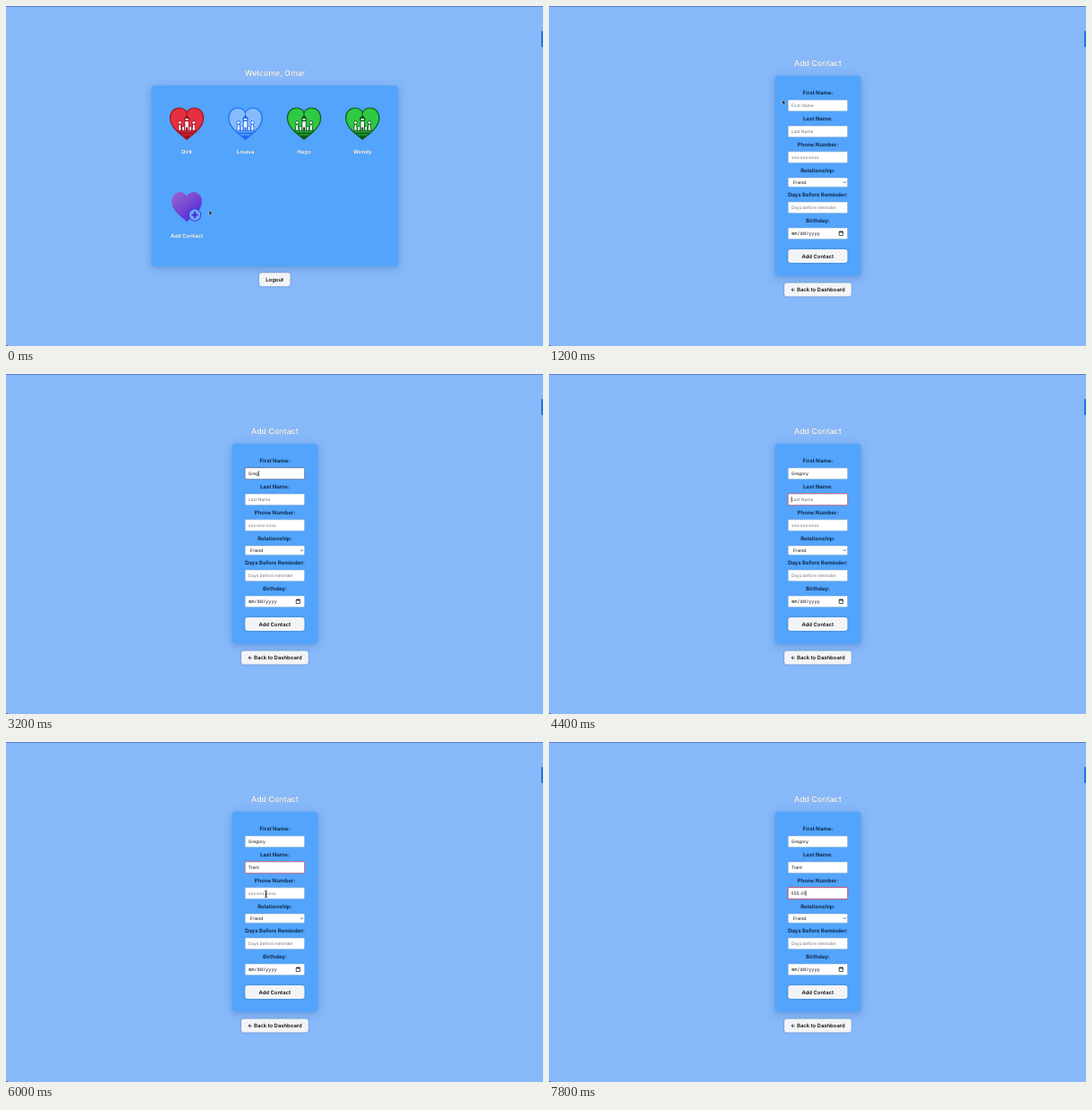
Recreate the animation shown at these times as an HTML page. Size 600x380 px, loop 8000 ms.

```html
<!DOCTYPE html>
<html lang="en">
<head>
<meta charset="utf-8">
<title>Contacts</title>
<style>
  html, body { margin: 0; width: 100%; height: 100%; overflow: hidden; background: #86b8fa; }
  svg { display: block; width: 600px; height: 380px; }
  text { font-family: Inter, "Open Sans", sans-serif; text-rendering: geometricPrecision; white-space: pre; }
  .mid { text-anchor: middle; }
  .title { font-size: 8.8px; font-weight: 600; fill: #fff; filter: drop-shadow(.5px .6px .7px #0007); }
  .name { font-size: 6px; font-weight: 700; fill: #fff; filter: drop-shadow(.4px .5px .4px #0007); }
  .label { font-size: 6px; font-weight: 700; fill: #112c50; }
  .btn { font-size: 5.9px; font-weight: 600; fill: #111; }
  .value { font-size: 4.9px; fill: #111; }
  .hint { font-size: 4.9px; fill: #777; }
  .small { font-size: 4.4px; fill: #444; }
  .date { font: 5.3px "Noto Sans Mono", "DejaVu Sans Mono", monospace; fill: #111; }
  .card { fill: #52a4fc; filter: drop-shadow(0 2px 4px #1c4c8850); }
  .button { fill: #f3f4f6; filter: drop-shadow(0 .6px .8px #0004); }
  .field { fill: #fff; stroke: #8fa6c4; stroke-width: .5; }
</style>
</head>
<body>
<svg id="stage" viewBox="0 0 600 380" xmlns="http://www.w3.org/2000/svg">
  <defs>
    <linearGradient id="violet" x1="0" y1="0" x2=".8" y2="1">
      <stop offset="0" stop-color="#a065cf"/>
      <stop offset=".5" stop-color="#7648d3"/>
      <stop offset="1" stop-color="#4a25dc"/>
    </linearGradient>
    <path id="heart" d="M0 17.5C-6 12-18.6 5-18.6-6.5-18.6-13-14-17.5-8.8-17.5-5-17.5-1.6-15.8 0-12.6 1.6-15.8 5-17.5 8.8-17.5 14-17.5 18.6-13 18.6-6.5 18.6 5 6 12 0 17.5Z"/>
    <clipPath id="inHeart"><use href="#heart"/></clipPath>
  </defs>
  <rect width="600" height="380" fill="#86b8fa"/>
  <rect width="600" height="1" fill="#5a7fd0"/>
  <rect x="598" y="28" width="4" height="18" rx="1" fill="#1d72dd"/>
  <rect y="379" width="1.5" height="1" fill="#2b426c"/>
  <g id="home"></g>
  <g id="form"></g>
  <g id="popup"></g>
  <path id="arrow" d="M0 0V5.2L1.2 4.1 2 6 2.9 5.6 2.1 3.8H3.7Z" fill="#111" stroke="#fff" stroke-width=".35"/>
  <path id="beam" d="M-1.4-3.8Q0-3.8 0-3V3Q0 3.8-1.4 3.8M1.4-3.8Q0-3.8 0-3V3Q0 3.8 1.4 3.8M-.8.8H.8" fill="none" stroke="#111" stroke-width=".7"/>
</svg>
<script>
const LOOP = 8000, STEP = 200, FORM_AT = 1200;
const $ = id => document.getElementById(id);

const text = (x, y, s, cls, id = '') => `<text x="${x}" y="${y}" class="${cls}" id="${id}">${s}</text>`;
const box = (x, y, w, h, r, cls) => `<rect x="${x}" y="${y}" width="${w}" height="${h}" rx="${r}" class="${cls}"/>`;

// Heart badge with a tower and two figures
function badge(x, name, fill, line) {
  const figure = s => `<g transform="translate(${s * 7.8} 0)">
    <circle cy="-1.2" r="1.9"/><path d="M-1.1.8H1.1L1.9 7.6H-1.9Z"/></g>`;
  return `<g transform="translate(${x} 131.5)">
    <use href="#heart" fill="${fill}"/>
    <g clip-path="url(#inHeart)">
      <rect x="-19" y="8" width="38" height="10" fill="${line}"/>
      <path d="M-13 9.3H13M-8 12.4H8" stroke="${fill}" stroke-width="1"/>
    </g>
    <g fill="#fff" stroke="${line}" stroke-width=".9">
      <path d="M-2.2 7.8V-3H2.2V7.8Z"/>
      <path d="M-2.6-3.4V-6L0-9.4 2.6-6V-3.4Z" fill="${line}"/>
      <path d="M0-9V-13"/>
      <path d="M-1.7-4V-5.6H1.7V-4Z" stroke="none"/>
      <path d="M-5.4 7.8V3.6Q-4 1.6-2.6 3.6V7.8ZM5.4 7.8V3.6Q4 1.6 2.6 3.6V7.8Z"/>
      ${figure(-1)}${figure(1)}
      <path d="M-1 7.6V4.4Q0 3 1 4.4V7.6Z" fill="${line}" stroke="none"/>
    </g>
    <use href="#heart" fill="none" stroke="${line}" stroke-width="1.2"/>
  </g>` + text(x, 165.2, name, 'name mid');
}

$('home').innerHTML =
  text(300.5, 78, 'Welcome, Omar', 'title mid') +
  box(162.5, 89, 275.8, 202, 4, 'card') +
  badge(202, 'Dirk', '#e5303f', '#9f1220') +
  badge(267.5, 'Louisa', '#86bbfc', '#1b6df0') +
  badge(333, 'Hugo', '#2fc943', '#0b5a17') +
  badge(398.3, 'Wendy', '#2fc943', '#0b5a17') +
  `<g id="adder">
    <use href="#heart" transform="scale(.91 .95)" fill="url(#violet)"/>
    <circle cx="9" cy="9" r="7.2" fill="#4b36d6"/>
    <circle cx="9" cy="9" r="6.2" fill="#6fa6f6"/>
    <path d="M9 5.6V12.4M5.6 9H12.4" stroke="#4030cf" stroke-width="2.2"/>
  </g>` +
  text(202, 258.8, 'Add Contact', 'name mid') +
  box(283, 298.2, 34.5, 15, 3, 'button') +
  text(300.2, 307.9, 'Logout', 'btn mid');

const labels = [
  ['First Name:', 99.2], ['Last Name:', 128], ['Phone Number:', 156.7],
  ['Relationship:', 185.5], ['Days Before Reminder:', 213.2], ['Birthday:', 241.7]
];
const inputs = [
  { y: 105, hint: 'First Name', value: 'Gregory', ring: '#5d6f8c', dash: '1.2 .7' },
  { y: 134, hint: 'Last Name', value: 'Trent', ring: '#c0708e', dash: 'none' },
  { y: 162.8, hint: 'xxx-xxx-xxxx', value: '555-01', ring: '#c85a78', dash: 'none' }
];
const field = (y, h = 12.4) => box(267.2, y, 66.3, h, .8, 'field');

$('form').innerHTML =
  text(300.3, 67, 'Add Contact', 'title mid') +
  box(252.5, 77.8, 96, 223.7, 4, 'card') +
  labels.map(([s, y]) => text(300.4, y, s, 'label mid')).join('') +
  inputs.map((f, i) => field(f.y) + text(270.8, f.y + 8, f.hint, 'hint', 'in' + i)).join('') +
  field(192, 10.2) + text(272.8, 198.9, 'Friend', 'value') +
  '<path d="M328.9 196.4L330.4 197.9 331.9 196.4" fill="none" stroke="#222" stroke-width=".7"/>' +
  field(219) + text(270.8, 227, 'Days before reminder', 'hint') +
  field(248) + text(271, 256, 'mm/dd/yyyy', 'date') +
  '<path d="M324.2 252.3H328.4V256.4H324.2ZM325.2 251.2V252M327.4 251.2V252" fill="none" stroke="#111" stroke-width=".7"/>' +
  '<path d="M324.2 252.8H328.4" stroke="#111"/>' +
  box(267.2, 272, 66.3, 15, 3, 'button') + text(300.3, 281.8, 'Add Contact', 'btn mid') +
  box(263, 309.5, 74.8, 15, 3, 'button') + text(300.3, 319.2, '← Back to Dashboard', 'btn mid') +
  '<rect id="ring" x="266.8" width="67" height="13.2" rx="1.2" fill="none" stroke-width="1"/>' +
  '<rect id="caret" width=".6" height="6.4" fill="#111"/>';

const person = y => `<g transform="translate(299.9 ${y})" fill="none" stroke="#333" stroke-width=".6">
  <circle r="2.5"/><circle cy="-.6" r=".9"/><path d="M-1.7 1.7Q0 .1 1.7 1.7"/></g>`;
$('popup').innerHTML =
  `<path d="M294 121H297.4L300 118.2 302.6 121H345Q346.4 121 346.4 122.4V160.8Q346.4 162.2 345 162.2H294.2Q292.8 162.2 292.8 160.8V122.4Q292.8 121 294 121Z"
    fill="#fafafa" style="filter:drop-shadow(0 .6px 1px #0006)"/>
  <path d="M292.8 146H346.4" stroke="#d8d8d8" stroke-width=".6"/>` +
  person(133) + person(154.2) +
  text(307.2, 130.9, 'OMAR', 'value', 'pick') +
  text(307.2, 138.7, 'OMAR TOVEK', 'small') +
  text(307.2, 156, 'Manage...', 'value');

// [time, field, letters typed]
const edits = [
  [1600, 0, 0], [2800, 0, 1], [3000, 0, 2], [3200, 0, 4], [3400, 0, 5], [3600, 0, 6], [4000, 0, 7],
  [4400, 1, 0], [4800, 1, 1], [5000, 1, 2], [5200, 1, 3], [5400, 1, 5],
  [6200, 2, 0], [6800, 2, 1], [7000, 2, 2], [7200, 2, 3], [7600, 2, 5], [7800, 2, 6]
];
// [time, pointer, x, y]
const pointer = [
  [0, 'arrow', 227, 228.5], [200, 'arrow', 223, 227.5], [400, 'arrow', 215, 225],
  [600, 'arrow', 211, 223], [800, 'arrow', 209.3, 222.3], [1200, 'arrow', 261, 105],
  [1400, 'beam', 274, 110], [1600, 'beam', 281, 111.5], [1800, 'arrow', 338, 126],
  [2000, 'arrow', 385, 147], [2200, 'arrow', 399.3, 151.3], [2800, ''],
  [5800, 'arrow', 355, 160], [6000, 'beam', 290.5, 170], [6800, '']
];
const hover = [[0, 1], [400, 1.08], [600, 1.16]];
const popups = [[0, -1], [1600, 0], [3000, -1], [6200, 2], [6800, -1]];

const at = (list, t) => list.filter(s => s[0] <= t).pop();
const show = (id, on) => $(id).setAttribute('display', on ? 'inline' : 'none');
const move = (id, x, y, s = 1) => $(id).setAttribute('transform', `translate(${x} ${y}) scale(${s})`);

function draw(t) {
  show('home', t < FORM_AT);
  show('form', t >= FORM_AT);
  move('adder', 202, 224.5, at(hover, t)[1]);

  inputs.forEach((f, i) => {
    const edit = at(edits.filter(e => e[1] === i), t);
    const n = edit ? edit[2] : 0;
    const el = $('in' + i);
    el.textContent = n ? f.value.slice(0, n) : f.hint;
    el.setAttribute('class', n ? 'value' : 'hint');
  });

  const edit = at(edits, t);
  show('ring', edit);
  show('caret', edit && t - edit[0] < 450);
  if (edit) {
    const [, i, n] = edit, f = inputs[i], ring = $('ring');
    ring.setAttribute('y', f.y - .4);
    ring.setAttribute('stroke', f.ring);
    ring.setAttribute('stroke-dasharray', f.dash);
    move('caret', 270.7 + (n ? $('in' + i).getComputedTextLength() : 0), f.y + 3);
  }

  const open = at(popups, t)[1];
  show('popup', open >= 0);
  if (open >= 0) {
    move('popup', 0, inputs[open].y - inputs[0].y);
    $('pick').textContent = open ? '555-0100' : 'OMAR';
  }

  const [, kind, x, y] = at(pointer, t);
  for (const id of ['arrow', 'beam']) show(id, id === kind);
  if (kind) move(kind, x, y);
}

const start = performance.now();
let shown = -1;
function tick() {
  const t = Math.floor((performance.now() - start) % LOOP / STEP) * STEP;
  if (t !== shown) draw(shown = t);
  requestAnimationFrame(tick);
}
tick();
</script>
</body>
</html>
```
